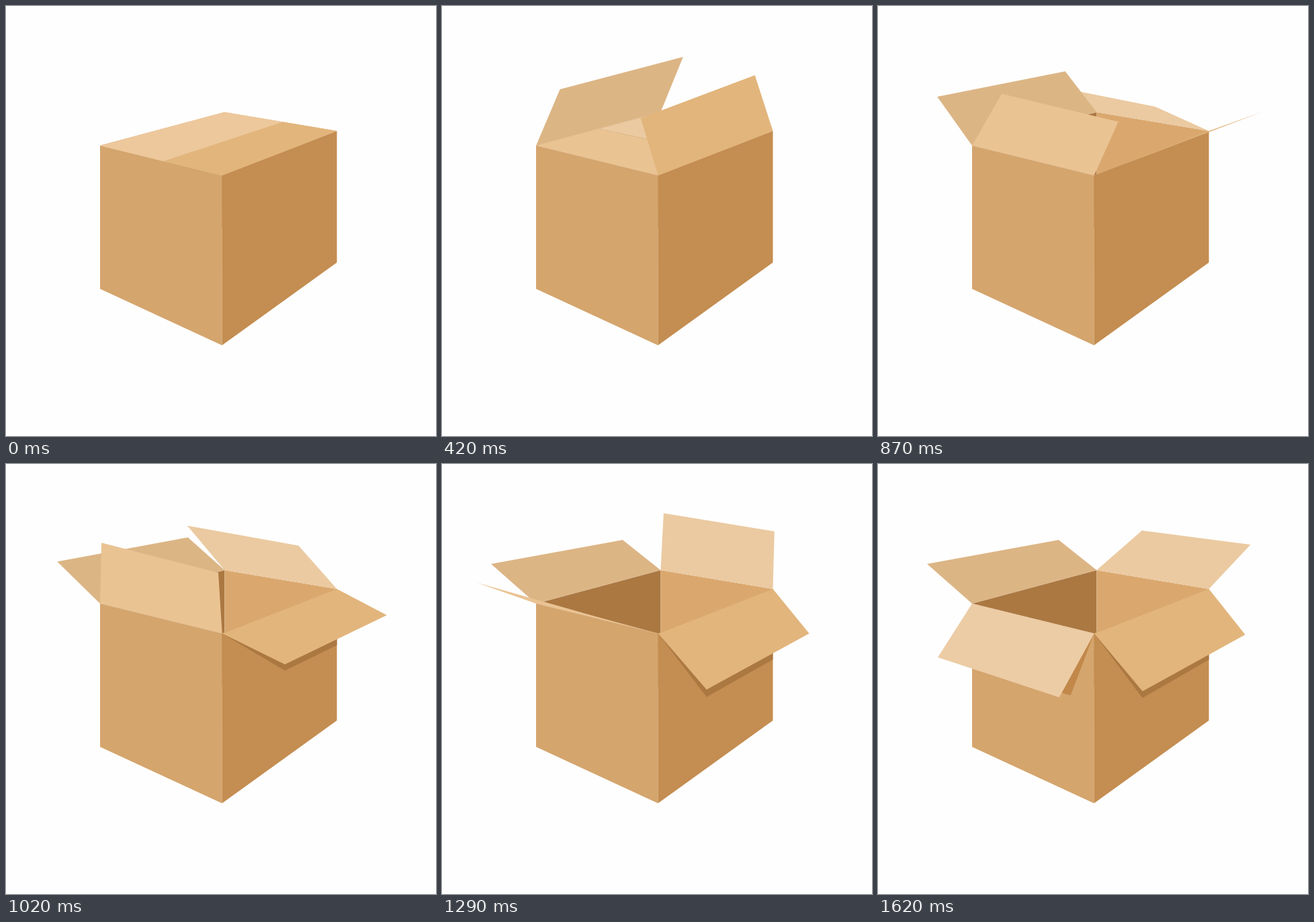
Recreate the animation shown at these times as an HTML page with a canvas. Size 640 by 640 pixels, loop 2.88 s.

```html
<!DOCTYPE html>
<html lang="en">
<head>
<meta charset="utf-8">
<title>Opening box</title>
<style>
  html, body { margin: 0; height: 100%; overflow: hidden; background: #fefefe; }
  canvas { display: block; width: 100vw; height: 100vh; }
</style>
</head>
<body>
<canvas id="stage" width="640" height="640"></canvas>
<script>
const ctx = document.getElementById('stage').getContext('2d');
const STEP = 30, LOOP = 2880, LAST = 54;

const mix = (a, b, u) => a + (b - a) * u;
const between = (p, q, u) => p.map((v, i) => mix(v, q[i], u));
const shift = (p, dx, dy) => [p[0] + dx, p[1] + dy];
const ramp = (f, from, to) => Math.min(1, Math.max(0, (f - from) / (to - from)));

// Rim corners: left, back, right, front
const L = [140, 207.7], B = [325.4, 158], R = [492.5, 186], F = [321.7, 252.3];
const LOW_L = [140, 421], LOW_F = [321.5, 505], LOW_R = [492.5, 381.7];
const FLOOR = [325.4, 251];
const RIGHT_FACE = [[321.2, 252.3], R, LOW_R, LOW_F, [321.5, 331], [321.2, 331]];
const TAN = '#e2b57c', DARK = '#ab7842';

// Closed flaps meet halfway across the rim
const sideSeam = [between(L, F, .52), between(B, R, .52)];
const endSeam = [between(L, B, .5), between(F, R, .5)];
const upright = [0, -89, 0, -89];

// Each pose: step reached, bend of the timing, offsets of the two outer corners
const flaps = {
  left: { hinge: [L, B], closed: sideSeam, start: 0, poses: [
    [18, 0, ...upright], [36, .5, -67, -59, -56.5, -45]] },
  right: { hinge: [F, R], closed: sideSeam, start: 0, poses: [
    [18, 0, ...upright], [36, -.45, 72, 79, 54, 63], [47, 0, 72, 86, 54, 68]] },
  front: { hinge: [L, F], closed: endSeam, start: 18, poses: [
    [29, -.85, 44, -77, 36, -80], [39, 0, -42, -82, -49, -80], [54, .48, -51, 80, -52, 95]] },
  back: { hinge: [B, R], closed: [endSeam[0], endSeam[1]], start: 18, poses: [
    [39, -.2, -22, -80, -22, -81], [54, .1, 67.5, -59, 62, -66]] }
};

// Angle counted from straight down, so that no flap crosses the wrap
function polar(x, y) {
  const a = Math.atan2(-y, x);
  return [a < -Math.PI / 2 ? a + 2 * Math.PI : a, Math.hypot(x, y)];
}

function swing({ hinge, closed, start, poses }, f) {
  let from = start, prev = hinge.map((p, i) => polar(closed[i][0] - p[0], closed[i][1] - p[1]));
  let now = prev;
  for (const [to, bend, ax, ay, bx, by] of poses) {
    if (f <= from) break;
    const x = ramp(f, from, to), u = x + bend * x * (1 - x);
    const next = [polar(ax, ay), polar(bx, by)];
    now = prev.map((p, i) => between(p, next[i], u));
    [from, prev] = [to, next];
  }
  const outer = now.map(([a, r], i) => shift(hinge[i], r * Math.cos(a), -r * Math.sin(a)));
  return { outer, angle: now[0][0], shape: [hinge[0], ...outer, hinge[1]] };
}

function trace(points) {
  ctx.beginPath();
  points.forEach(p => ctx.lineTo(...p));
  ctx.closePath();
}

function poly(color, ...points) {
  trace(points);
  ctx.fillStyle = color;
  ctx.fill();
}

function drawRightShadow(f, [a, b]) {
  const grow = ramp(f, 29, 36), settle = ramp(f, 36, 47);
  ctx.save();
  trace(RIGHT_FACE);
  ctx.clip();
  poly(DARK, F, shift(a, 0, 13 * grow - 3 * settle), shift(b, 0, 12 * grow - 6 * settle), R);
  ctx.restore();
}

function drawFrontShadow(f, tip) {
  const grow = ramp(f, 47, LAST);
  poly('#c1884a', F, between(F, tip, .93), shift(tip, 17 * grow, -3 * grow));
}

// Angle at which a flap is seen edge-on
const edgeOn = (p, q) => Math.atan2(p[1] - q[1], q[0] - p[0]);

function draw(f) {
  const left = swing(flaps.left, f), right = swing(flaps.right, f);
  const front = swing(flaps.front, f), back = swing(flaps.back, f);

  ctx.fillStyle = '#fefefe';
  ctx.fillRect(0, 0, 640, 640);

  poly(DARK, L, B, FLOOR, F);
  poly('#daa86e', B, R, F, FLOOR);
  poly('#d4a56d', L, F, LOW_F, LOW_L);
  poly('#c48d51', ...RIGHT_FACE);

  poly('#ebcaa1', ...back.shape);
  // The left flap lies over the front one until it turns edge-on
  const lifted = left.angle > edgeOn(L, B);
  if (lifted) poly('#dcb585', ...left.shape);
  drawFrontShadow(f, front.outer[1]);
  poly(front.angle > Math.PI + edgeOn(L, F) ? '#eccca5' : '#eac393', ...front.shape);
  if (!lifted) poly('#edc89c', ...left.shape);
  drawRightShadow(f, right.outer);
  poly(TAN, ...right.shape);
}

const start = performance.now();
function tick() {
  const t = (performance.now() - start) % LOOP;
  draw(Math.min(LAST, Math.floor(t / STEP)));
  requestAnimationFrame(tick);
}
tick();
</script>
</body>
</html>
```
